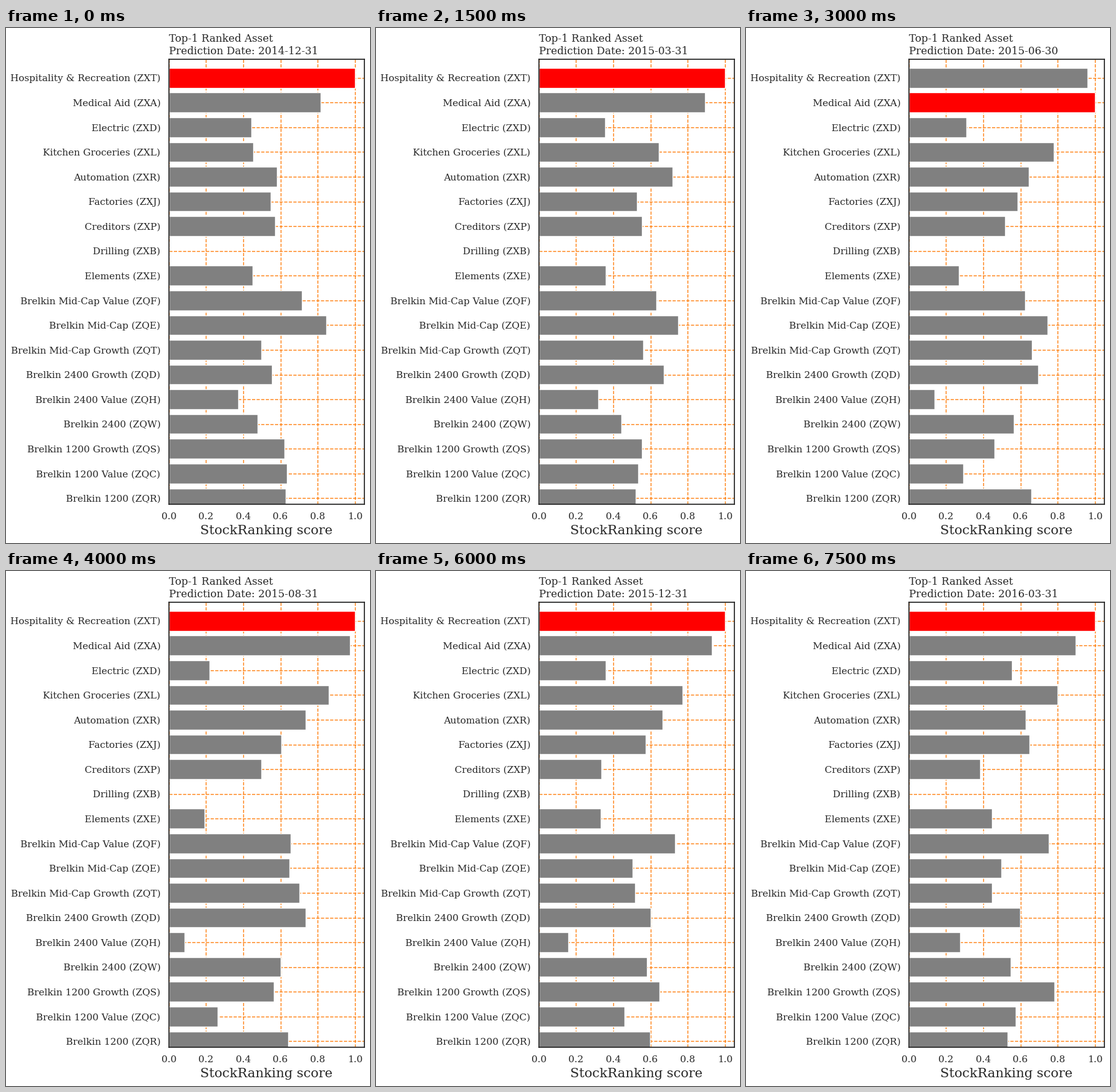
These frames come from a looping animation (583x824 px, 8 s). A matplotlib script:

```python
import matplotlib.pyplot as plt
import numpy as np
from matplotlib.animation import FuncAnimation

W, H, DPI = 583, 824, 100
LEFT, RIGHT, TOP, BOTTOM = 260.75, 573.75, 50.04, 762.24
INK = "0.15"
STEPS, STEP_MS = 16, 500

# Each asset's score in the first, a middle and the last month
KEY_STEPS = [0, 8, 15]
ASSETS = {
    "Hospitality & Recreation (ZXT)": (1, 1, 1),
    "Medical Aid (ZXA)": (0.815, 0.973, 0.896),
    "Electric (ZXD)": (0.443, 0.218, 0.554),
    "Kitchen Groceries (ZXL)": (0.453, 0.859, 0.799),
    "Automation (ZXR)": (0.581, 0.735, 0.628),
    "Factories (ZXJ)": (0.547, 0.604, 0.648),
    "Creditors (ZXP)": (0.571, 0.497, 0.383),
    "Drilling (ZXB)": (0, 0, 0),
    "Elements (ZXE)": (0.450, 0.192, 0.446),
    "Brelkin Mid-Cap Value (ZQF)": (0.715, 0.655, 0.752),
    "Brelkin Mid-Cap (ZQE)": (0.846, 0.648, 0.497),
    "Brelkin Mid-Cap Growth (ZQT)": (0.497, 0.701, 0.446),
    "Brelkin 2400 Growth (ZQD)": (0.554, 0.735, 0.597),
    "Brelkin 2400 Value (ZQH)": (0.373, 0.084, 0.275),
    "Brelkin 2400 (ZQW)": (0.477, 0.601, 0.547),
    "Brelkin 1200 Growth (ZQS)": (0.621, 0.564, 0.782),
    "Brelkin 1200 Value (ZQC)": (0.634, 0.262, 0.574),
    "Brelkin 1200 (ZQR)": (0.628, 0.641, 0.530),
}
SECOND_LEADS = [2, 6, 7, 10, 13, 14]  # months when the second asset is on top


def build_scores():
    """Drift between the key scores, with a seeded wobble in between."""
    steps = np.arange(STEPS)
    scores = np.column_stack(
        [np.interp(steps, KEY_STEPS, keys) for keys in ASSETS.values()])
    wobble = np.random.default_rng(7).normal(0, 0.24, scores.shape)
    wobble[KEY_STEPS] = 0
    scores += wobble * scores * (1 - scores)  # none at the ends of the scale
    scores[SECOND_LEADS, :2] = 0.96, 1
    return scores.clip(0, 1)


def month_end(k):
    year, month = divmod(11 + k, 12)
    if month == 1:
        days = 28
    else:
        days = 30 if month in (3, 5, 8, 10) else 31
    return f"{2014 + year}-{month + 1:02d}-{days}"


def title_text(k):
    return f"Top-1 Ranked Asset\nPrediction Date: {month_end(k)}"


plt.rcParams.update({
    "font.family": "DejaVu Serif",
    "text.color": INK,
    "axes.labelcolor": INK,
    "axes.edgecolor": INK,
    "axes.linewidth": 1.25,
})

SCORES = build_scores()
rows = np.arange(len(ASSETS))

fig = plt.figure(figsize=(W / DPI, H / DPI), dpi=DPI, facecolor="white")
ax = fig.add_axes([LEFT / W, 1 - BOTTOM / H, (RIGHT - LEFT) / W, (BOTTOM - TOP) / H])
bars = ax.barh(rows, SCORES[0], height=0.8, edgecolor="white", linewidth=1)
ax.set_xlim(0, 1.05)
ax.set_ylim(17.25, -0.75)
ax.set_xticks(np.arange(6) / 5)
ax.set_yticks(rows, list(ASSETS))
ax.tick_params(length=0, pad=9.5, labelsize=11, labelcolor=INK)
ax.set_axisbelow(True)
ax.grid(color="tab:orange", linestyle="--", linewidth=1)
ax.set_xlabel("StockRanking score", fontsize=15)
title = ax.set_title(title_text(0), loc="left", fontsize=12)


def update(k):
    leader = SCORES[k].argmax()
    for i, (bar, score) in enumerate(zip(bars, SCORES[k])):
        bar.set_width(score)
        bar.set_facecolor("red" if i == leader else "gray")
    title.set_text(title_text(k))
    return [*bars, title]


anim = FuncAnimation(fig, update, frames=STEPS, init_func=lambda: update(0),
                     interval=STEP_MS, repeat=True, repeat_delay=0, blit=False)
plt.show()
```
